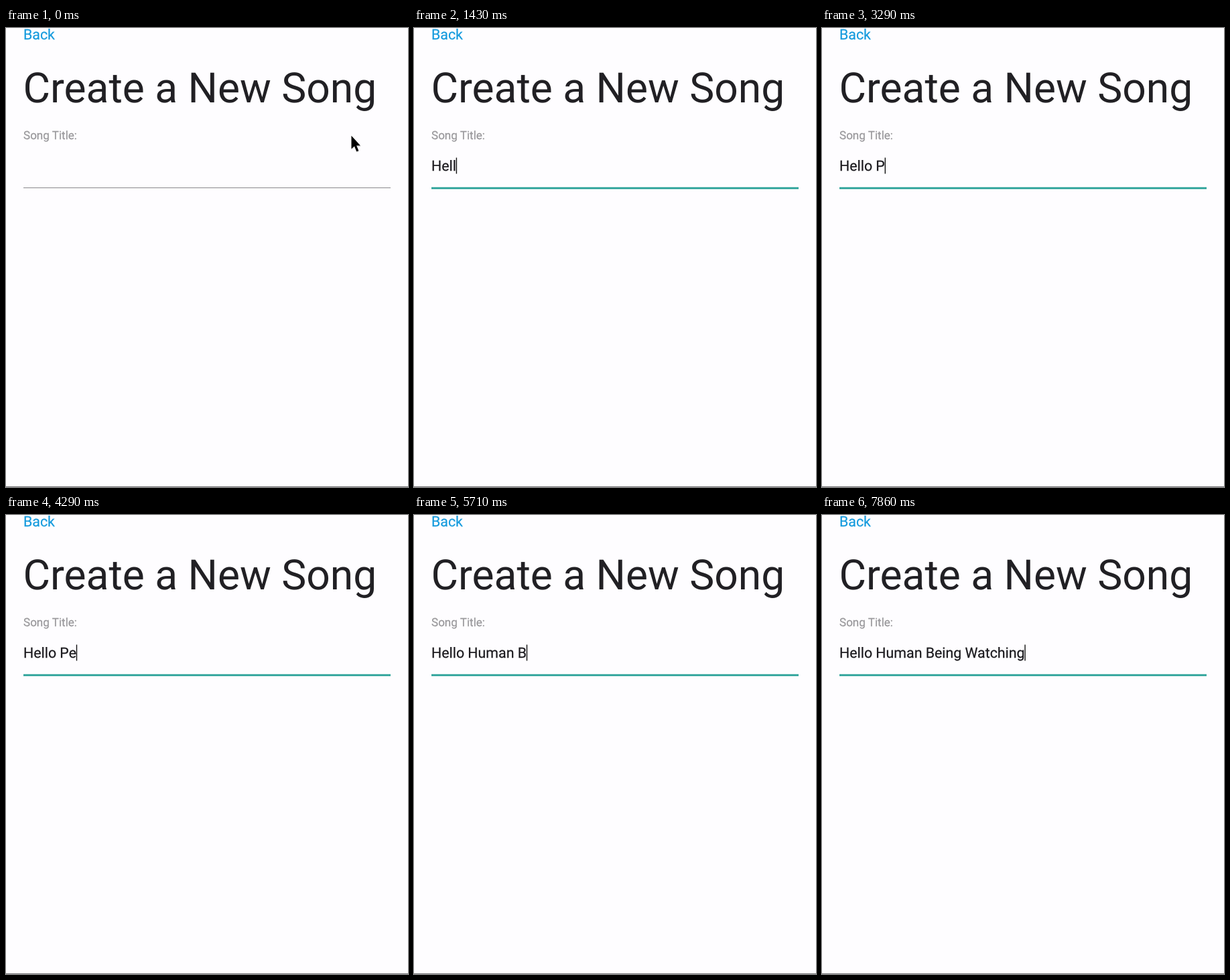
Animation, 600 px wide and 685 px high, one loop 8000 ms. Source, as an HTML page:

```html
<!DOCTYPE html>
<html lang="en">
<head>
<meta charset="utf-8">
<title>Create a New Song</title>
<style>
  html, body { margin: 0; width: 100%; height: 100%; overflow: hidden; background: #fefdff; }
  svg { display: block; width: 600px; height: 685px; }
  text { font-family: Roboto, sans-serif; white-space: pre; text-rendering: geometricPrecision; }
  .small { font-size: 21.33px; stroke-width: .25px; }
</style>
</head>
<body>
<svg viewBox="0 0 600 685" xmlns="http://www.w3.org/2000/svg">
  <rect width="600" height="685" fill="#fefdff"/>
  <text class="small" x="26" y="17" fill="#169bdd" stroke="#169bdd">Back</text>
  <text x="25.4" y="111.3" font-size="62.3" fill="#212024">Create a New Song</text>
  <text class="small" x="26" y="166" style="font-size:17.07px" fill="#99989b" stroke="#99989b">Song Title:</text>
  <text class="small" id="title" x="26" y="213.3" fill="#1c1b1f" stroke="#1c1b1f"></text>
  <rect id="line" x="26" width="548"/>
  <rect id="caret" y="193.5" width="1.4" height="24" fill="#111"/>
  <rect y="684" width="600" height="1" fill="#77767a"/>
  <g id="arrow" transform="translate(515 160)" stroke-linejoin="round">
    <path d="M.5 2V22L5 18L8.3 25.8L12 24.2L8.8 16.8H14.5Z" fill="#000" opacity=".18"/>
    <path d="M.5 .8V20.5L5 16.6L8.3 24.6L11.4 23.3L8.2 15.4H14Z" fill="#000" stroke="#fff" stroke-width="1.2" paint-order="stroke"/>
  </g>
  <path id="beam" d="M-4 -9.5Q0 -9.5 0 -6.5Q0 -9.5 4 -9.5M0 -7V7M-4 9.5Q0 9.5 0 6.5Q0 9.5 4 9.5M-2 3H2"
        fill="none" stroke="#222" stroke-width="1.3"/>
</svg>
<script>
const LOOP = 8000, FPS = 7;
const el = id => document.getElementById(id);
const title = el('title'), line = el('line'), caret = el('caret'), arrow = el('arrow'), beam = el('beam');

// Keystrokes: first tick, then one key per tick; "<" is backspace.
const runs = [
  [6, 'He'], [9, 'llo'], [15, ' '], [22, 'P'], [26, 'ers<<<'], [31, '<'],
  [32, 'Human '], [40, 'Bein'], [43, 'g '], [48, 'Watching ']
];
// Tick ranges in which the caret is dark.
const caretOff = [[0, 3], [14, 15], [18, 21], [47, 48]];
const beamPath = [[442, 196], [338, 222], [307, 229], [307, 229]];

const tickStart = n => Math.round(n * 100 / FPS) * 10;

function tickAt(t) {
  const n = Math.round(t * FPS / 1000);
  return tickStart(n) > t ? n - 1 : n;
}

function typed(tick) {
  let s = '';
  for (const [start, keys] of runs)
    for (const key of keys.slice(0, Math.max(0, tick - start + 1)))
      s = key === '<' ? s.slice(0, -1) : s + key;
  return s;
}

function show(node, on) {
  node.setAttribute('visibility', on ? 'visible' : 'hidden');
}

function setLine(y, height, fill) {
  line.setAttribute('y', y);
  line.setAttribute('height', height);
  line.setAttribute('fill', fill);
}

function draw(t) {
  const tick = tickAt(t);
  const text = typed(tick);
  title.textContent = text;
  caret.setAttribute('x', 26 + (text ? title.getComputedTextLength() : 0) - .2);
  show(caret, !caretOff.some(([a, b]) => tick >= a && tick < b));

  if (tick < 3) setLine(238, 1, '#8a898d');
  else if (tick < 4) setLine(237.7, 2, '#55a09a');
  else setLine(237.6, 2.8, '#26a097');

  show(arrow, tick < 1);
  show(beam, tick >= 1 && tick < 6);
  const [x, y] = beamPath[Math.min(Math.max(tick - 1, 0), beamPath.length - 1)];
  beam.setAttribute('transform', `translate(${x} ${y})`);
}

const begin = performance.now();
function loop(now) {
  draw(Math.max(0, now - begin) % LOOP);
  requestAnimationFrame(loop);
}
draw(0);
requestAnimationFrame(loop);
</script>
</body>
</html>
```
